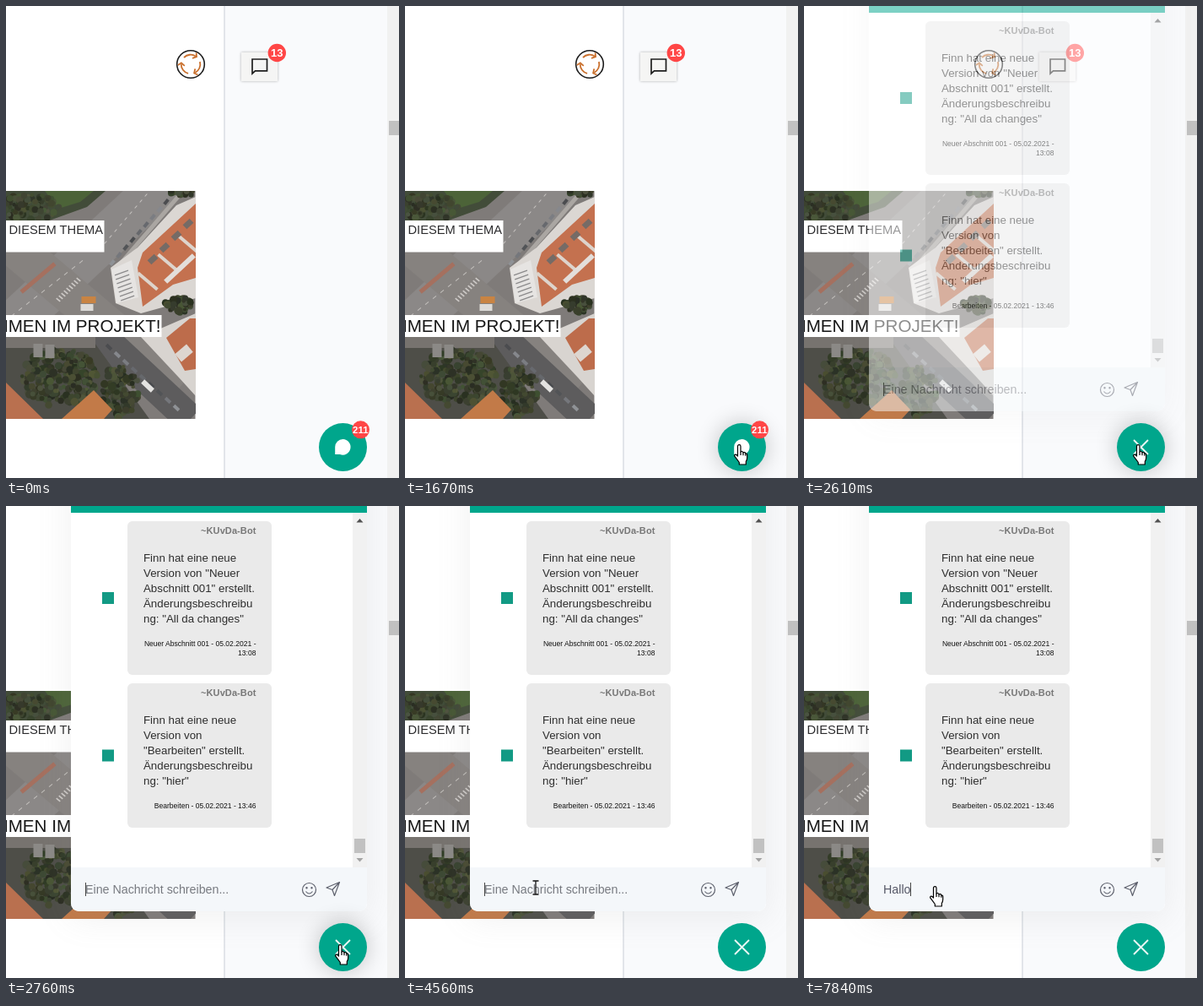
An HTML page with a canvas for the animation above (8 s loop, 466x559 px).

```html
<!DOCTYPE html>
<html lang="de">
<head>
<meta charset="utf-8">
<title>Chatfenster</title>
<style>
  html, body { margin: 0; width: 466px; height: 559px; overflow: hidden; background: #fff; }
  body { position: relative; font-family: "Liberation Sans", Arial, sans-serif; }
  svg, canvas, .panel, .note, .launcher, .typed { position: absolute; left: 0; top: 0; }
  canvas { top: 219px; }
  .anim { animation: 8s step-end infinite; }

  .note {
    left: 279px; top: 55px; width: 43px; height: 34px;
    background: #f5f5f4; box-shadow: 0 0 3px rgba(0, 0, 0, .3);
  }

  .panel { width: 466px; height: 559px; animation: open 8s linear infinite; }
  .window, .shade {
    position: absolute; left: 77px; top: -60px; width: 351px; height: 540px;
    border-radius: 9.5px; overflow: hidden;
  }
  .window { background: #fff; }
  .shade { box-shadow: 0 7px 38px 2px rgba(148, 149, 150, .13); }
  .head { height: 68px; background: #00a68c; }
  .input { position: absolute; bottom: 0; width: 100%; height: 52px; background: #f4f7fa; }
  .body { font-size: 13.3px; fill: #2e2e2e; }
  .author { font-size: 11px; font-weight: bold; letter-spacing: .1px; fill: #777; text-anchor: end; }
  .meta { font-size: 8.55px; fill: #111; text-anchor: end; }
  #hint { font-size: 14.25px; fill: #777a80; }
  .typed {
    left: 94px; top: 446px; height: 16px;
    font-size: 14.25px; line-height: 16px; white-space: pre; color: #565867;
    border-right: 1px solid #444;
  }

  .launcher {
    left: 371px; top: 494px; width: 57px; height: 57px; border-radius: 50%;
    background: #00a68c; animation: hover 8s linear infinite;
  }
  .closed { animation-name: closed; }
  .cross { animation-name: opened; }
  .badge { fill: #ff4646; }
  .count { fill: #fff; font-weight: bold; text-anchor: middle; }

  .cursor { animation-name: move; }
  .click { animation-name: click; }
  .arrow { animation-name: arrow; }
  .hand { animation-name: hand; }
  .beam { animation-name: beam; }

  @keyframes open {
    0%, 30.7% { opacity: 0; animation-timing-function: ease-in-out }
    34.5%, 100% { opacity: 1 }
  }
  @keyframes hover {
    0%, 12.1%, 45.9%, 100% { box-shadow: 0 0 26px 1.5px rgba(0, 0, 0, 0) }
    14.6%, 43.4% { box-shadow: 0 0 26px 1.5px rgba(0, 0, 0, .2) }
  }
  @keyframes closed { 0% { opacity: 1 } 30.6%, 100% { opacity: 0 } }
  @keyframes opened { 0% { opacity: 0 } 30.6%, 100% { opacity: 1 } }
  @keyframes move {
    0% { transform: translate(404px, 600px) }
    5.5% { transform: translate(404px, 551px) }
    6.5% { transform: translate(436px, 546px) }
    9.375% { transform: translate(436px, 546px); animation-timing-function: steps(11, jump-start) }
    19.875% { transform: translate(384px, 514px); animation-timing-function: steps(2, jump-start) }
    21.875% { transform: translate(394px, 520px) }
    43.5% { transform: translate(394px, 520px); animation-timing-function: steps(5, jump-start) }
    48.2% { transform: translate(157px, 456px); animation-timing-function: steps(2, jump-start) }
    50%, 100% { transform: translate(153px, 451px) }
  }
  @keyframes click {
    0%, 27.75%, 57%, 100% { opacity: 0 }
    24.875%, 54.125% { opacity: 1 }
  }
  @keyframes arrow { 0%, 43.5% { opacity: 1 } 12.1%, 46.3%, 100% { opacity: 0 } }
  @keyframes hand { 0%, 43.5% { opacity: 0 } 12.1%, 79.375%, 100% { opacity: 1 } }
  @keyframes beam { 0%, 79.375%, 100% { opacity: 0 } 46.3% { opacity: 1 } }
</style>
</head>
<body>

<svg width="466" height="559">
  <rect x="259" width="193" height="559" fill="#f9fafc"/>
  <rect x="258" width="2" height="559" fill="#e2e5ea"/>
  <rect x="452" width="14" height="559" fill="#f1f1f1"/>
  <rect x="454" y="136" width="12" height="17" fill="#c1c1c1"/>
</svg>

<canvas id="photo" width="225" height="270"></canvas>
<div class="note"></div>

<svg width="466" height="559">
  <defs>
    <g id="turn" fill="none" stroke="#c96f2c" stroke-width="1.8">
      <path d="M-8 -8A11.3 11.3 0 0 1 6 -9.6"/>
      <path d="M6.600 -13.600L7 -8.800L2 -7.200"/>
    </g>
  </defs>

  <g transform="translate(219 69)">
    <circle r="16.3" fill="#fff" stroke="#1c1c1c" stroke-width="1.6"/>
    <use href="#turn"/>
    <use href="#turn" transform="rotate(120)"/>
    <use href="#turn" transform="rotate(240)"/>
  </g>

  <path d="M292 63H309.5V76.800H295.500L292 80Z" fill="none" stroke="#1e1e1e" stroke-width="1.7"/>
  <circle class="badge" cx="321.300" cy="55.500" r="10.7"/>
  <text class="count" x="321.300" y="60" font-size="13">13</text>

  <path d="M0 254H116.500V291.500H0zM0 366H184.500V392H0z" fill="#fff"/>
  <g fill="#2c2c2e" text-anchor="end">
    <text x="115" y="269.500" font-size="14.7">DIESEM THEMA</text>
    <text x="183.500" y="386" font-size="20.6" fill="#161616">WILLKOMMEN IM PROJEKT!</text>
  </g>
</svg>

<div class="panel">
  <div class="shade"></div>
  <div class="window"><div class="head"></div><div class="input"></div></div>
  <svg width="466" height="559">
    <rect x="411" y="8" width="17" height="420" fill="#f1f1f1"/>
    <rect x="413" y="394" width="13" height="17" fill="#c1c1c1"/>
    <path d="M415.500 19.500h8l-4 -4.500z" fill="#505050"/>
    <path d="M415.500 417h8l-4 4.500z" fill="#a3a3a3"/>

    <g id="messages"></g>

    <text id="hint" x="94" y="459">Eine Nachricht schreiben...</text>
    <g transform="translate(359.500 454.500)" fill="none" stroke="#5d606c" stroke-width="1.2" stroke-linejoin="round">
      <circle r="8"/>
      <path d="M-4 2Q0 7 4 2"/>
      <path d="M36 -9L20.500 -2.500L27.500 0L30 7ZL27.500 0"/>
      <path d="M-3 -2.200h.01M3 -2.200h.01" stroke-width="2.4" stroke-linecap="round"/>
    </g>
  </svg>
  <div class="typed" id="typed"></div>
</div>

<div class="launcher"></div>

<svg width="466" height="559">
  <g class="closed anim">
    <path d="M399.500 513A9.300 9.300 0 1 1 396 531H390.200V522.300A9.300 9.300 0 0 1 399.500 513Z" fill="#fff"/>
    <circle class="badge" cx="420.500" cy="501.800" r="10.5"/>
    <text class="count" x="420.300" y="505.700" font-size="11.4">211</text>
  </g>
  <path class="cross anim" d="M391 514L408 531M408 514L391 531" stroke="#e9f7f4" stroke-width="1.9"/>

  <g class="cursor anim">
    <circle class="click anim" r="12" fill="#ff0" fill-opacity=".45"/>
    <path class="arrow anim" d="M.5 .5V16.500L4.200 13L6.700 18.700L9.200 17.600L6.700 12H11.700Z"
      fill="#fff" stroke="#000"/>
    <g class="hand anim" transform="translate(-4 -1)" stroke="#000" stroke-width="1.2" stroke-linejoin="round">
      <path fill="#fff" d="M4.500 14V2.500Q4.500 .7 6.200 .7Q8 .7 8 2.500V9.500Q8 8.300 9.500 8.500Q11 8.800 11 10.300
        Q11.500 9.200 12.800 9.600Q13.800 10 13.800 11.200Q15.700 10.600 15.700 12.800V16Q15.700 18.500 14.300 20.500V24
        H6.300V21.500Q4.500 19 1 14.400Q.2 13.200 1.300 12.300Q2.600 11.700 4.500 14Z"/>
      <path fill="none" d="M8 9.500V13M11 10.300V13.300M13.800 11.200V13.800"/>
    </g>
    <path class="beam anim" d="M-1.500 -7H5.500M2 -7V9M-1.500 9H5.500" fill="none" stroke="#111" stroke-width="1.3"/>
  </g>
</svg>

<script>
  const $ = id => document.getElementById(id);

  // Chat messages
  const text = (type, x, y, words) => `<text class="${type}" x="${x}" y="${y}">${words}</text>`;

  function message(y, height, lines, meta) {
    return `<rect x="144" y="${y}" width="171" height="${height}" rx="5.7" fill="#eaeaea"/>
      <rect x="114" y="${y + height / 2 - 7}" width="14" height="14" fill="#129a84"/>`
      + text('author', 296.5, y + 15, '~KUvDa-Bot')
      + lines.map((s, i) => text('body', 163, y + 48 + i * 18, s)).join('')
      + meta.map((s, i) => text('meta', 296.5, y + 148 + i * 11, s)).join('');
  }

  $('messages').innerHTML =
    message(18, 182, ['Finn hat eine neue', 'Version von "Neuer', 'Abschnitt 001" erstellt.',
      'Änderungsbeschreibu', 'ng: "All da changes"'], ['Neuer Abschnitt 001 - 05.02.2021 -', '13:08']) +
    message(210, 171, ['Finn hat eine neue', 'Version von', '"Bearbeiten" erstellt.',
      'Änderungsbeschreibu', 'ng: "hier"'], ['Bearbeiten - 05.02.2021 - 13:46']);

  // Aerial view of a crossing
  const c = $('photo').getContext('2d');
  c.translate(0, -219);

  let seed = 7;
  const rand = () => (seed = seed * 16807 % 2147483647) / 2147483647;

  function poly(color, ...pts) {
    c.beginPath();
    for (let i = 0; i < pts.length; i += 2) c.lineTo(pts[i], pts[i + 1]);
    c.fillStyle = color;
    c.fill();
  }
  // A turned rectangle around a centre
  function box(color, x, y, w, h, angle) {
    c.save();
    c.translate(x, y);
    c.rotate(angle);
    c.fillStyle = color;
    c.fillRect(-w / 2, -h / 2, w, h);
    c.restore();
  }
  // A row of equal boxes from one place towards another
  function row(color, count, x, y, dx, dy, w, h, angle) {
    for (let i = 0; i < count; i++) box(color, x + dx * i, y + dy * i, w, h, angle);
  }
  function trees(x, y, rx, ry, count) {
    for (let i = 0; i < count; i++) {
      const a = rand() * 2 * Math.PI, d = Math.sqrt(rand());
      c.fillStyle = `hsl(${65 + rand() * 30} ${12 + rand() * 12}% ${15 + rand() * 14}%)`;
      c.beginPath();
      c.arc(x + d * rx * Math.cos(a), y + d * ry * Math.sin(a), 2 + rand() * 3, 0, 7);
      c.fill();
    }
  }

  // Streets
  box('#7f7b79', 112, 354, 225, 270, 0);
  box('#8b8887', 90, 300, 330, 52, -.75);
  box('#86827f', 80, 345, 330, 46, .7);
  box('#aaa6a2', 166, 270, 120, 5, -.86);
  box('#a5705f', 38, 322, 52, 5, -.7);
  row('#c9c6c3', 10, 166, 224, -6, 7, 4, 1, -.85);
  row('#c4c1be', 10, 8, 366, 9, -7, 5, 1, -.66);
  row('#cfccc9', 9, 62, 348, 3, -3, 6, 1.5, .7);

  // Park
  poly('#424c39', 0, 219, 118, 219, 96, 238, 46, 256, 0, 258);
  poly('#4c6338', 46, 219, 104, 219, 88, 232, 62, 240);
  trees(30, 238, 34, 16, 90);
  trees(210, 220, 16, 7, 26);

  // Upper block
  poly('#dbd7d3', 225, 226, 202, 236, 156, 286, 124, 310, 130, 352, 160, 364, 225, 346);
  poly('#c4714f', 225, 234, 162, 292, 156, 310, 162, 356, 198, 330, 225, 322);
  row('#ddd4cc', 3, 168, 326, 24, -22, 30, 4, .7);
  row('#756b66', 4, 174, 300, 14, -14, 11, 7, -.75);
  box('#e3deda', 206, 311, 46, 6, -.75);
  poly('#e6e4e2', 125, 312, 149, 301, 157, 345, 131, 352);
  row('#8b8a8b', 7, 137, 316, 1.2, 5, 17, 1.3, -.35);
  trees(205, 354, 18, 9, 45);

  // Lower block
  box('#5d5c5d', 160, 435, 160, 36, .75);
  poly('#d8d4d0', 160, 392, 225, 364, 225, 462, 205, 440);
  poly('#bd6c4b', 190, 393, 218, 370, 225, 370, 225, 430, 212, 432);
  box('#ddd6d0', 211, 411, 18, 12, -.7);
  poly('#4e4e48', 0, 392, 100, 392, 170, 489, 0, 489);
  box('#77736f', 53, 398, 106, 14, 0);
  trees(64, 440, 46, 34, 240);
  trees(136, 456, 22, 32, 130);
  poly('#b9704f', 0, 446, 44, 489, 0, 489);
  poly('#c27a48', 66, 489, 104, 455, 126, 478, 116, 489);
  row('#8b8986', 2, 38, 408, 14, 1, 11, 16, 0);

  // Traffic
  for (let i = 0; i < 9; i++) {
    const shade = `hsl(220 3% ${20 + rand() * 40}%)`;
    box(shade, 190 - i * 8, 232 + i * 9, 4, 7, .7);
    box(shade, 122 + i * 10, 404 + i * 9, 8, 4, .75);
  }
  box('#e4e3e1', 168, 450, 16, 6, .75);
  box('#c98443', 98, 348, 17, 8, 0);
  box('#dddbd8', 96, 357, 15, 8, 0);

  // Typing and caret follow the clock of the cursor
  const clock = document.querySelector('.cursor').getAnimations()[0];
  const strokes = [6350, 6670, 6820, 6970, 7290, 7840];

  function tick() {
    const t = (clock.currentTime || 0) % 8000;
    const count = strokes.filter(s => s <= t).length;
    const lit = count > 0 || Math.floor((t - 2920) / 533) % 2 !== 0;
    $('typed').textContent = 'Hallo '.slice(0, count);
    $('typed').style.borderColor = lit ? '#444' : 'transparent';
    $('hint').style.opacity = count ? 0 : 1;
    requestAnimationFrame(tick);
  }
  tick();
</script>
</body>
</html>
```
